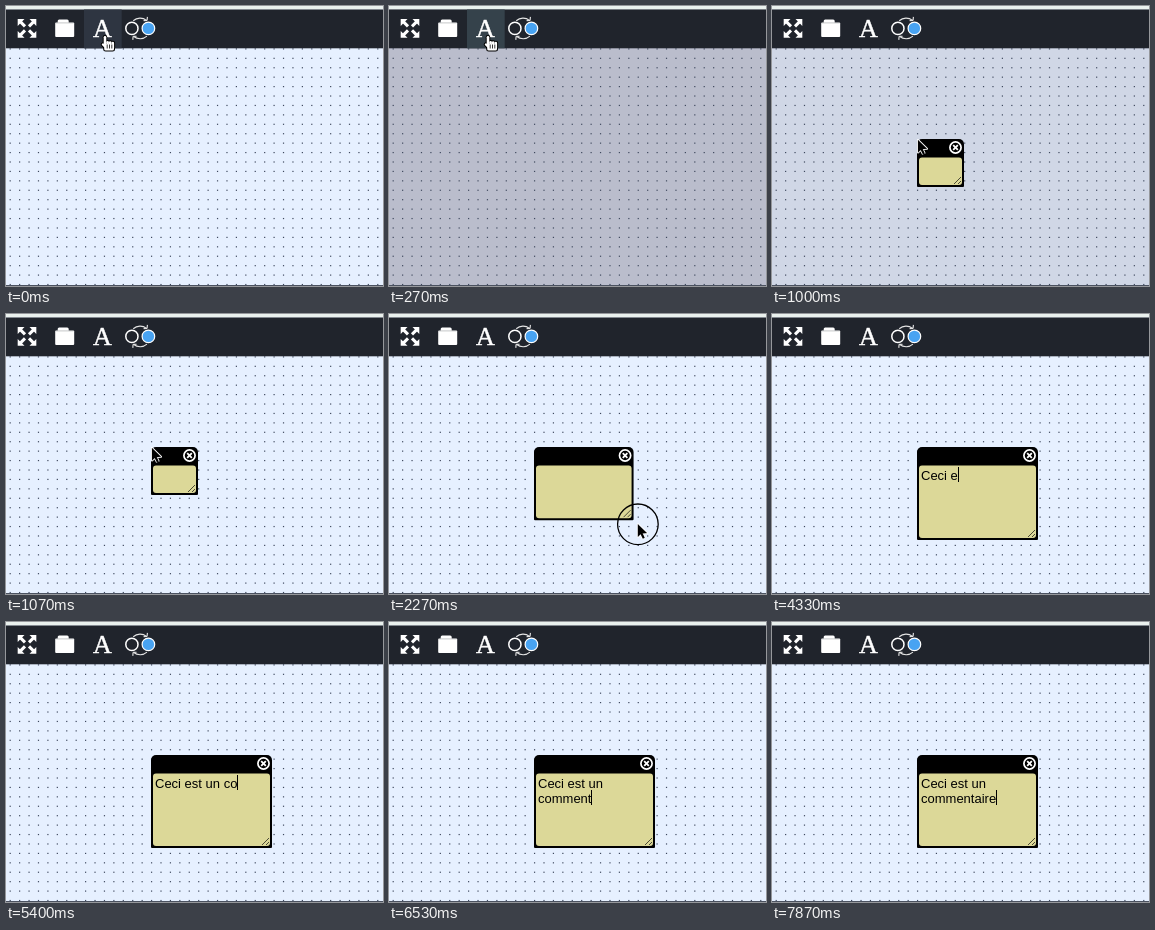
An HTML page with a canvas for the animation above (7940 ms loop, 377x280 px).

```html
<!DOCTYPE html>
<html lang="fr">
<head>
<meta charset="utf-8">
<title>Commentaire</title>
<style>
html, body { margin: 0; width: 100%; height: 100%; overflow: hidden; }
canvas { display: block; }
</style>
</head>
<body>
<canvas id="stage" width="377" height="280"></canvas>
<script>
const ctx = document.getElementById('stage').getContext('2d');
const LOOP = 7940, TICK = 1000 / 15;
const SCALE = 377 / 400, GRID = 10 * SCALE, BUTTON = 40 * SCALE;
const TOOLBAR_TOP = 3.5, TOOLBAR_BOTTOM = 42.3;
const NOTE = { x: 145, y: 133 };
const TEXT = 'Ceci est un commentaire';
const FOCUS = 3070, TYPING = 3580;

// Each move ends at a point; bend makes the path sag away from a straight line.
const HOME = { x: 98.7, y: 31 };
const MOVES = [
  { from: 470, to: 930, x: 146, y: 134, bend: 1 },
  { from: 1270, to: 1730, x: 188, y: 178, bend: 1 },
  { from: 1930, to: 2400, x: 262, y: 223, bend: 1.7 },
  { from: 2730, to: 3000, x: 224, y: 174, bend: 1 }
];
const DRAG = MOVES[2];

const progress = (t, from, to) => Math.min(1, Math.max(0, (t - from) / (to - from)));
const ease = p => (1 - Math.cos(Math.PI * p)) / 2;
const mix = (a, b, p) => a + (b - a) * p;

// A steady typing pace with one pause inside the last word.
const keyTime = i => TYPING + i * 139 + (i > 14 ? 330 : 0);

function pointerAt(t) {
  return MOVES.reduce((p, move) => {
    const e = ease(progress(t, move.from, move.to));
    return { x: mix(p.x, move.x, e), y: mix(p.y, move.y, e ** move.bend) };
  }, HOME);
}

function fill(color) {
  ctx.fillStyle = color;
  ctx.fill();
}

function stroke(color, width) {
  ctx.strokeStyle = color;
  ctx.lineWidth = width;
  ctx.stroke();
}

function rect(x, y, w, h, color) {
  ctx.fillStyle = color;
  ctx.fillRect(x, y, w, h);
}

function rounded(x, y, w, h, r, color) {
  ctx.beginPath();
  ctx.roundRect(x, y, w, h, r);
  fill(color);
}

function line(x1, y1, x2, y2, color, width) {
  ctx.beginPath();
  ctx.moveTo(x1, y1);
  ctx.lineTo(x2, y2);
  stroke(color, width);
}

function circle(x, y, r) {
  ctx.beginPath();
  ctx.arc(x, y, r, 0, Math.PI * 2);
}

function triangle(x1, y1, x2, y2, x3, y3, color) {
  ctx.beginPath();
  ctx.moveTo(x1, y1);
  ctx.lineTo(x2, y2);
  ctx.lineTo(x3, y3);
  ctx.closePath();
  fill(color);
}

function placed(x, y, angle, draw) {
  ctx.save();
  ctx.translate(x, y);
  ctx.rotate(angle);
  draw();
  ctx.restore();
}

function drawBoard(shade) {
  const channels = [mix(230, 186, shade), mix(240, 189, shade), mix(255, 204, shade)];
  rect(0, 0, 377, 280, `rgb(${channels.map(Math.round)})`);
  for (let y = TOOLBAR_BOTTOM; y < 280; y += GRID)
    for (let x = 3.6; x < 377; x += GRID)
      rect(x, y, 1.2, 1.2, '#3f495e');
  rect(0, 279, 377, 1, '#4b5260');
}

function drawExpandIcon() {
  for (let i = 0; i < 4; i++) {
    placed(0, 0, i * Math.PI / 2, () => {
      triangle(9.3, -9.3, 9.3, -2.5, 2.5, -9.3, '#fff');
      line(2, -2, 7, -7, '#fff', 3);
    });
  }
}

function drawFolderIcon() {
  rounded(-9.5, -6, 19, 14.7, 1, '#fff');
  rounded(-7, -9, 11, 4, [1.5, 1.5, 0, 0], '#fff');
  line(-9, -5.5, 9, -5.5, '#8b8e93', 0.5);
}

function drawLetterIcon() {
  ctx.font = '26px "Liberation Serif", serif';
  ctx.textAlign = 'center';
  ctx.fillStyle = '#fff';
  ctx.fillText('A', 0, 9);
  ctx.strokeStyle = '#fff';
  ctx.lineWidth = 0.5;
  ctx.strokeText('A', 0, 9);
}

function drawSwapIcon() {
  for (const side of [0, Math.PI]) {
    placed(0, 0, side, () => {
      ctx.beginPath();
      ctx.arc(0, 0, 10.3, -2.3, -0.9);
      stroke('#e4e4e4', 1.1);
      line(7, -8, 7.3, -11.5, '#e4e4e4', 1.1);
      line(7, -8, 3.5, -7.8, '#e4e4e4', 1.1);
    });
  }
  circle(-8.2, 0, 6.1);
  fill('#20242c');
  stroke('#fff', 1.5);
  circle(8.3, 0, 6.3);
  fill('#48a3f2');
  stroke('#fff', 1.2);
}

function drawToolbar(t) {
  const height = TOOLBAR_BOTTOM - TOOLBAR_TOP;
  rect(0, 0, 377, TOOLBAR_TOP, '#eaf1ee');
  rect(0, TOOLBAR_TOP, 377, height, '#20242c');
  if (t < 540) rect(78, TOOLBAR_TOP, BUTTON, height, t < 130 ? '#2e3541' : '#35424b');
  [drawExpandIcon, drawFolderIcon, drawLetterIcon, drawSwapIcon].forEach(
    (icon, i) => placed(21 + i * BUTTON, 22.4, 0, icon));
}

function drawCross(size, width) {
  line(-size, -size, size, size, '#fff', width);
  line(size, -size, -size, size, '#fff', width);
}

function drawNote(t) {
  const drag = pointerAt(Math.min(Math.max(t - 40, DRAG.from), DRAG.to));
  const right = drag.x + 4, bottom = drag.y + 3;
  const { x, y } = NOTE;
  rounded(x, y, right - x, bottom - y, [5, 5, 1, 1], '#000');
  rounded(x + 2, y + 18.5, right - x - 4, bottom - y - 20.5, 3, '#dcd898');
  placed(right - 8.5, y + 8.5, 0, () => {
    circle(0, 0, 5.6);
    stroke('#fff', 1.7);
    drawCross(2.3, 1.8);
  });
  for (const size of [7, 3])
    line(right - 3 - size, bottom - 3, right - 3, bottom - 3 - size, '#4c4a35', 1);
}

function drawText(t) {
  const typed = [...TEXT].filter((_, i) => keyTime(i) <= t).join('');
  const wrapAt = TEXT.lastIndexOf(' ') + 1;
  const wrapped = typed.length > wrapAt + 5;
  const lines = wrapped ? [typed.slice(0, wrapAt), typed.slice(wrapAt)] : [typed];
  ctx.font = '13px "Liberation Sans", Arial, sans-serif';
  ctx.textAlign = 'left';
  ctx.fillStyle = '#000';
  lines.forEach((text, i) => ctx.fillText(text, 149, 165.5 + i * 15));

  const lastInput = typed ? keyTime(typed.length - 1) : FOCUS;
  const blinkOn = (t - lastInput) % 900 < 480;
  if (t >= FOCUS && blinkOn) {
    const row = lines.length - 1;
    rect(Math.round(149 + ctx.measureText(lines[row]).width), 153 + row * 15, 1, 15, '#000');
  }
}

function drawArrow() {
  ctx.lineJoin = 'round';
  const head = new Path2D('M0 0V12.5L3.5 9.3 9 8.8Z');
  const tail = new Path2D('M3 8L5.9 14');
  for (const [color, grow] of [['#fff', 2], ['#000', 0.2]]) {
    ctx.strokeStyle = color;
    ctx.lineWidth = grow;
    ctx.stroke(head);
    ctx.lineWidth = 2 + grow;
    ctx.stroke(tail);
    ctx.fillStyle = color;
    ctx.fill(head);
  }
}

function drawHand() {
  for (const [color, grow] of [['#000', 1], ['#fff', 0]]) {
    const part = (x, y, w, h) =>
      rounded(x - grow, y - grow, w + 2 * grow, h + 2 * grow, 1.5 + grow, color);
    part(-1, -1, 2.6, 11);
    for (let i = 1; i < 4; i++) part(-1 + i * 2.6, 3.5 + i * 0.4, 2.6, 7);
    part(-0.5, 7, 9.8, 6.5);
    placed(-2, 7.5, -0.8, () => part(-1, -1, 2.4, 6));
  }
  for (let x = 2.5; x < 8; x += 2.3) line(x, 7.5, x, 11.5, '#000', 0.8);
}

function drawBeam() {
  line(0, -5.5, 0, 5.5, '#000', 1.3);
  line(-2, 2.5, 2, 2.5, '#000', 1);
  for (const end of [-1, 1])
    for (const side of [-1, 1])
      line(0, end * 5.3, side * 3.5, end * 6.7, '#000', 1.2);
}

function drawPointer(t) {
  if (t >= TYPING) return;
  const { x, y } = pointerAt(t);
  if (t >= DRAG.from && t < 2530) {
    circle(x, y, 20.3);
    stroke('#000', 1.3);
  }
  placed(x, y, 0, t < 540 ? drawHand : t < 2870 ? drawArrow : drawBeam);
}

function render(t) {
  drawBoard(progress(t, 0, 270) * (1 - progress(t, 930, 1070)));
  drawToolbar(t);
  if (t >= 1000) drawNote(t);
  drawText(t);
  drawPointer(t);
}

function frame(now) {
  const step = Math.floor((now % LOOP + 5) / TICK);
  render(Math.min(7870, Math.round(step * TICK / 10) * 10));
  requestAnimationFrame(frame);
}
frame(0);
</script>
</body>
</html>
```
